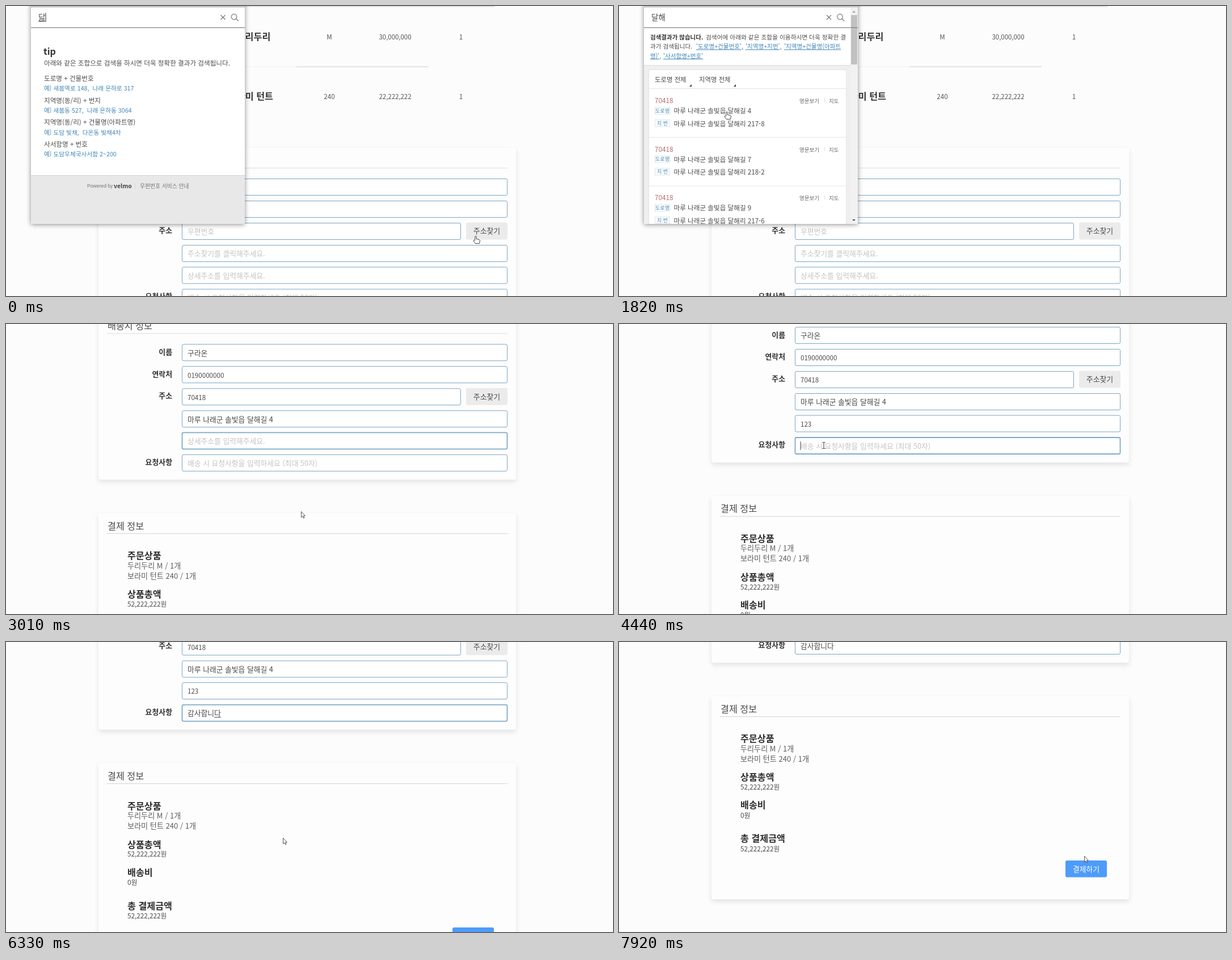
Animation of 1070x511 px, one loop 7990 ms. Source, as an HTML page:

```html
<!DOCTYPE html>
<html lang="ko">
<head>
<meta charset="utf-8">
<title>주문서</title>
<style>
html, body { margin: 0; width: 100%; height: 100%; overflow: hidden; background: #fdfcfd; }
svg { display: block; width: 1070px; height: 511px; }
text { font-family: "Noto Sans CJK KR", "Noto Sans CJK", "Noto Sans CJK JP", sans-serif; white-space: pre; }
.card { fill: #fdfdfd; filter: drop-shadow(0 4px 4px rgba(0,0,0,.1)); }
.window { fill: #fff; filter: drop-shadow(0 1px 4px rgba(0,0,0,.45)); }
</style>
</head>
<body>
<svg id="stage" viewBox="0 0 1070 511"></svg>
<script>
const LOOP = 7990;
const BLUE = '#3f86b8', INK = '#4a4a4a', HINT = '#c3c3c3', EDGE = '#7ba6c3';
const TERM = '달해', ZIP = '70418', TOWN = '마루 나래군 솔빛읍 달해';
const ITEMS = ['두리두리', '보라미 턴트'];

// Markup helpers; text is placed by its vertical centre.
const text = (x, y, s, size = 12.8, fill = INK, more = '') =>
  `<text x="${x}" y="${(y + size * .37).toFixed(2)}" font-size="${size}" fill="${fill}" ${more}>${s}</text>`;
const bold = 'font-weight="700"', mid = 'text-anchor="middle"', end = 'text-anchor="end"';
const rect = (x, y, w, h, fill, more = '') =>
  `<rect x="${x}" y="${y}" width="${w}" height="${h}" fill="${fill}" ${more}/>`;
const path = (d, fill, more = '') => `<path d="${d}" fill="${fill}" ${more}/>`;
const field = (id, y, w = 573) =>
  rect(310.5, y + .5, w, 29, '#fff', `rx="2.5" stroke="${EDGE}" id="${id}Box"`) +
  text(320, y + 15.5, '', 12.8, INK, `id="${id}"`);

function product(y, name, x, size, price) {
  return text(x, y, name, 16.2, '#333', bold + ' ' + mid) +
    text(570, y + .5, size, 11.6, '#555', mid) +
    text(686, y + .5, price, 11.4, '#555', mid) +
    text(802, y + .5, '1', 11.6, '#555', mid);
}

function hoodie() {
  return rect(246, 10, 87, 88, '#f3f2f2') +
    path('M281 39C279 25 283 15 291 15S303 25 301 39L313 43Q318 48 321 80L318 84H314L313 87H269L268 84H264L260 80Q263 48 268 43Z', '#222326') +
    path('M285 37C283 26 286 20 291 20S299 26 297 37L291 42Z', '#0c0c0e') +
    path('M280 67H302L307 79H275ZM288 41V51M294 41V51M270 56L268 83M312 56L314 83', 'none', 'stroke="#111214"');
}

function shoe() {
  return path('M252 153Q258 156 264 151H283L300 164L314 167Q319 170 318 178H252Z', '#e6dfde') +
    path('M252 153Q257 157 264 152L266 162Q259 164 259 174H252ZM275 150H283L301 164L294 167L277 157ZM264 165Q278 172 297 166L284 175H262ZM299 168L314 167Q319 170 318 175H298Z', '#93868a') +
    rect(251, 175.5, 68, 4.5, '#97888b', 'rx="1.5"');
}

function page() {
  const labels = [['이름', 318], ['연락처', 356.5], ['주소', 395], ['요청사항', 511.5]];
  const heads = [['주문상품', 677], ['상품총액', 745], ['배송비', 794], ['총 결제금액', 853]];
  return rect(150, 0, 711, 1.5, '#ddd9da') +
    hoodie() + shoe() +
    product(54.5, ITEMS[0], 436.5, 'M', '30,000,000') +
    product(159.5, ITEMS[1], 431.5, '240', '22,222,222') +
    rect(170, 106.5, 342, 1, '#efedee') + rect(512, 106.5, 233, 1, '#cfcccd') +
    rect(163, 250, 736, 293, '', 'rx="4" class="card"') +
    text(179, 271.5, '배송지 정보', 16.2, INK) + rect(178, 285, 706, 1, '#dcdcdc') +
    labels.map(([s, y]) => text(293, y, s, 12.9, '#333', bold + ' ' + end)).join('') +
    field('name', 304) + field('phone', 343) + field('zip', 382, 491) +
    field('road', 421) + field('detail', 459.5) + field('note', 498.5) +
    rect(811, 381.5, 73, 30, '#ebebeb', 'rx="3"') + text(847.5, 396.5, '주소찾기', 12.9, INK, mid) +
    rect(163, 602, 736, 358, '', 'rx="4" class="card"') +
    text(179, 624.5, '결제 정보', 16.2, INK) + rect(178, 637.5, 706, 1, '#d3d3d3') +
    heads.map(([s, y]) => text(214, y, s, 16.2, '#2e2e2e', bold)).join('') +
    text(214, 694.5, ITEMS[0] + ' M / 1개', 13.1, '#5c5c5c') +
    text(214, 712.5, ITEMS[1] + ' 240 / 1개', 13.1, '#5c5c5c') +
    text(214, 762.5, '52,222,222원', 11.7) + text(214, 812, '0원', 11.9) +
    text(214, 871, '52,222,222원', 11.7) +
    rect(787, 891.5, 73, 29.5, '#4d9bfb', 'rx="3"') + text(823.5, 906.5, '결제하기', 12.8, '#fff', mid) +
    rect(0, 1017, 1070, 60, '#e2eff5') +
    text(531, 1032.5, 'contributed by Unit-8 @belno', 11.6, '#8494a0', mid) +
    rect(0, 0, 1, 15, '#444', 'id="caret"') + rect(0, 0, 0, 1, '#444', 'id="under"');
}

function tips() {
  const rows = [
    ['도로명 + 건물번호', '예) 새봄역로 148,  나래 은하로 317'],
    ['지역명(동/리) + 번지', '예) 새봄동 527,  나래 은하동 3064'],
    ['지역명(동/리) + 건물명(아파트명)', '예) 도담 빛채,  다온동 빛채4차'],
    ['사서함명 + 번호', '예) 도담우체국사서함 2~200']];
  return text(66, 80.5, 'tip', 16, '#333', bold) +
    text(67, 100.5, '아래와 같은 조합으로 검색을 하시면 더욱 정확한 결과가 검색됩니다.', 11.6) +
    rows.map(([a, b], i) => text(67, 127.5 + i * 38.8, a, 11.6) +
      text(67, 145 + i * 38.8, b, 10.7, BLUE)).join('') +
    rect(44, 298, 377, 86, '#e8e8e8') + rect(44, 298, 377, 1, '#d4d4d4') +
    `<text x="143" y="320" font-size="8.6" fill="#777" style="font-family:'Liberation Sans',sans-serif">Powered by</text>` +
    text(190, 317, 'velmo', 10.4, '#444', bold) + rect(227.5, 312, 1, 10, '#dadada') +
    text(236, 317.5, '우편번호 서비스 안내', 9.8, '#777');
}

function result(y, road, lot) {
  const badge = (cy, s) => rect(63.5, cy - 6.5, 26, 12, '#fff', 'stroke="#dbe5ec"') +
    text(76.5, cy - .5, s, 9, BLUE, mid);
  return text(63, y, ZIP, 11.7, '#b46a6a') +
    text(318, y + .5, '영문보기', 9.5, '#666') + rect(362, y - 4, 1, 7, '#ddd') +
    text(370, y + .5, '지도', 9.5, '#666') +
    badge(y + 18, '도로명') + text(96.5, y + 18, TOWN + '길 ' + road, 11.6) +
    badge(y + 40, '지 번') + text(96.5, y + 40.5, TOWN + '리 ' + lot, 11.6) +
    rect(52, y + 64, 348, 1, '#e6e6e6');
}

function results() {
  const link = (x, y, s) => text(x, y, s, 10.6, BLUE, 'text-decoration="underline"');
  const filter = (x, s) => text(x, 129.5, s, 11.4) + path(`M${x + 65} 138v4h-4z`, '#333');
  return text(55, 55, '검색결과가 많습니다.', 10.5, '#333', bold) +
    text(153, 55, '검색어에 아래와 같은 조합을 이용하시면 더욱 정확한 결', 10.7) +
    text(55, 71.5, '과가 검색됩니다.', 10.6) +
    link(136, 71.5, "'도로명+건물번호',") + link(223, 71.5, "'지역명+지번',") +
    link(291, 71.5, "'지역명+건물명(아파트") + link(55, 88, "명)',") + link(78, 88, "'사서함명+번호'") +
    rect(44, 104, 364, 280, '#efefef') + rect(44, 104, 364, 1, '#ddd') +
    rect(52.5, 112.5, 348, 280, '#fff', 'stroke="#e2e2e2"') +
    filter(63, '도로명 전체') + filter(141, '지역명 전체') + rect(52, 145, 348, 1, '#e2e2e2') +
    result(167, 4, '217-8') + result(252.5, 7, '218-2') + result(338, 9, '217-6') +
    rect(408, 3, 13, 381, '#f1f1f1') + rect(409, 16, 11, 87, '#c1c1c1') +
    path('M411 11.5h6l-3-3z', '#999') + path('M411 376h6l-3 3z', '#555');
}

function popup() {
  return rect(44, -70, 377, 454, '', 'class="window"') +
    `<g clip-path="url(#pane)">` + rect(44, 0, 377, 384, '#fff') +
    `<g id="tips">${tips()}</g><g id="results">${results()}</g>` +
    rect(44, 0, 377, 2.5, '#c9c2c3') + rect(44, 37.5, 377, 1.3, '#858585') +
    text(57, 20, '', 13.6, INK, 'id="term"') +
    `<g id="termMark">${rect(57, 26.5, 12.5, 1, '#333')}${rect(69.5, 12, 1, 16, '#333')}</g>` +
    `<g id="icons" fill="none" stroke="#777" stroke-width="1.2"><path d="M378.5 16l8 8m0-8l-8 8"/>
     <circle cx="402" cy="19" r="4.8"/><path d="M405.5 22.5l4 4"/></g></g>`;
}

const cursors = `<g id="cursor">
  <path id="arrow" d="M.5 .5V10.8L2.9 8.6L4.5 12L6 11.3L4.4 8H7.4Z" fill="#fff" stroke="#555"/>
  <path id="hand" d="M-1.2 8V1.2Q0 -.6 1.2 1.2V5.4L6.5 6.8Q7.6 7.3 7.4 9L6.4 13.5H-.6L-4 9Q-4 7.4 -2.6 7.6Z" fill="#fff" stroke="#444"/>
  <path id="beam" d="M-2.5 -5.5H-1L0 -4.8L1 -5.5H2.5M0 -4.8V4.8M-2.5 5.5H-1L0 4.8L1 5.5H2.5" fill="none" stroke="#333"/></g>`;

const stage = document.getElementById('stage');
stage.innerHTML = `<defs><clipPath id="pane"><rect x="44" y="0" width="377" height="384"/></clipPath></defs>
  <g id="page">${page()}</g><g id="popup">${popup()}</g>${cursors}`;
const el = {};
stage.querySelectorAll('[id]').forEach(n => el[n.id] = n);

const show = (n, on) => n.setAttribute('visibility', on ? 'visible' : 'hidden');
const clamp = v => Math.max(0, Math.min(1, v));
const smooth = v => v * v * (3 - 2 * v);

// Eased value between keys [time, ...values].
function tween(keys, t) {
  let i = keys.length - 1;
  while (i > 0 && keys[i][0] > t) i--;
  const a = keys[i], b = keys[i + 1] || a;
  const k = smooth(clamp((t - a[0]) / (b[0] - a[0] || 1)));
  return a.slice(1).map((v, j) => v + (b[j + 1] - v) * k);
}
// Latest entry [time, value] that has started.
const latest = (steps, t) => steps.filter(s => s[0] <= t).pop();

const PICK = 2310, NOTE_FOCUS = 4250, BLUR = 7150;
const scrollKeys = [[0, 0], [2730, 0], [3080, 299], [6220, 299], [6480, 527.5], [7230, 527.5], [7450, 506.5]];
const mouseKeys = [[0, 828, 405], [1000, 828, 405], [1650, 190, 186], [PICK, 190, 186], [2450, 394, 258],
  [2720, 520, 330], [3720, 520, 330], [4160, 361, 214], [5950, 361, 214], [6500, 525, 383],
  [6640, 525, 383], [7060, 820, 377]];
const detailKeys = [[PICK, ''], [3400, '1'], [3540, '12'], [3680, '123']];
const noteKeys = [[NOTE_FOCUS, ''], ...['ㄱ', '가', '감', '감ㅅ', '감사', '감삽', '감사하', '감사합',
  '감사합ㄴ', '감사합니', '감사합닏', '감사합니다'].map((s, i) => [4940 + i * 70, s])];

function fill(id, value, hint = '') {
  el[id].textContent = value || hint;
  el[id].setAttribute('fill', value ? INK : HINT);
}

function focus(id, on) {
  el[id + 'Box'].setAttribute('stroke', on ? '#7fabc9' : EDGE);
  el[id + 'Box'].setAttribute('stroke-width', on ? 1.8 : 1);
}

function drawForm(t) {
  const picked = t >= PICK;
  const detail = latest(detailKeys, t) || [0, ''], note = latest(noteKeys, t) || [0, ''];
  fill('name', '구라온');
  fill('phone', '0190000000');
  fill('zip', picked && ZIP, '우편번호');
  fill('road', picked && TOWN + '길 4', '주소찾기를 클릭해주세요.');
  fill('detail', detail[1], '상세주소를 입력해주세요.');
  fill('note', note[1], '배송 시 요청사항을 입력하세요 (최대 50자)');
  for (const id of ['phone', 'zip']) el[id].setAttribute('font-size', id === 'phone' || picked ? 11.6 : 12.8);
  el.detail.setAttribute('font-size', detail[1] ? 11.6 : 12.8);

  const onNote = t >= NOTE_FOCUS && t < BLUR, onDetail = picked && t < NOTE_FOCUS;
  focus('detail', onDetail);
  focus('note', onNote);
  const [since, typed] = onNote ? note : detail;
  const width = typed ? el[onNote ? 'note' : 'detail'].getComputedTextLength() : 0;
  const y = onNote ? 506 : 467;
  show(el.caret, (onNote || onDetail) && (t - since) % 1060 < 530);
  el.caret.setAttribute('x', 319.5 + width);
  el.caret.setAttribute('y', y);
  show(el.under, onNote && typed);
  el.under.setAttribute('x', 320 + width - 11.8);
  el.under.setAttribute('y', y + 14.5);
  el.under.setAttribute('width', 11.8);
}

function drawPopup(t) {
  const k = clamp((t - PICK) / 210), found = t >= 560;
  const s = 1 - .048 * k;
  show(el.tips, !found && k < 1);
  show(el.results, found && k < 1);
  el.popup.setAttribute('opacity', clamp(1 - 1.2 * k));
  el.popup.setAttribute('transform', `translate(232.5 167) scale(${s}) translate(-232.5 -167)`);
  el.term.textContent = t < 140 ? '닳' : TERM;
  show(el.termMark, t < 140);
  el.icons.setAttribute('transform', `translate(${found ? -12.5 : 0} 0)`);
}

function drawCursor(t, scroll) {
  const [x, y] = tween(mouseKeys, t), py = y + scroll;
  const within = (l, r, top, b) => x > l && x < r && py > top && py < b;
  const covered = t < PICK + 200 && x < 421 && y < 384;
  const row = (py - 304) % 39;
  let kind = 'arrow';
  if (covered) {
    if (within(60, 255, 175, 215)) kind = 'hand';
  } else if (within(811, 884, 381, 412) || within(787, 860, 891, 921)) kind = 'hand';
  else if (within(311, 884, 304, 529) && row < 30) kind = 'beam';
  for (const id of ['arrow', 'hand', 'beam']) show(el[id], id === kind);
  el.cursor.setAttribute('transform', `translate(${x} ${y})`);
}

function draw(t) {
  const [scroll] = tween(scrollKeys, t);
  el.page.setAttribute('transform', `translate(0 ${-scroll})`);
  drawForm(t);
  drawPopup(t);
  drawCursor(t, scroll);
}

const start = performance.now();
function tick() {
  draw((performance.now() - start) % LOOP);
  requestAnimationFrame(tick);
}
tick();
</script>
</body>
</html>
```
